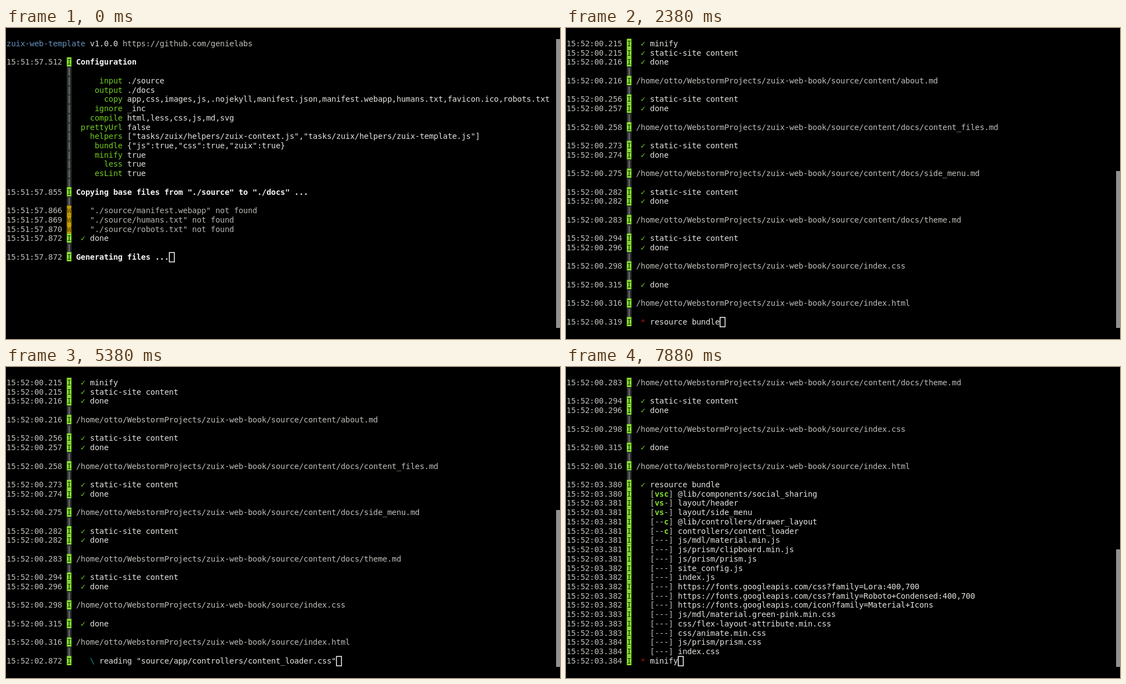
An HTML page with a canvas for the animation above (8000 ms loop, 998 px wide and 561 px high).

```html
<!DOCTYPE html>
<html lang="en">
<head>
<meta charset="utf-8">
<title>Build log</title>
<style>
  html, body { margin: 0; width: 100%; height: 100%; overflow: hidden; background: #000; }
  canvas { display: block; }
</style>
</head>
<body>
<canvas width="998" height="561"></canvas>
<script>
const ctx = document.querySelector('canvas').getContext('2d');
const LOOP = 8000, CELL_W = 8, CELL_H = 16, SCALE = 1.0455;
const FONT = '13.6px "DejaVu Sans Mono", monospace';

// "^x" inside a line switches to style x; capitals are bold
const STYLES = {
  w: '#e2e2de', d: '#bdbfb9', n: '#b4b6b0', b: '#6591bd', g: '#73cb22', c: '#06989a', r: '#b01010',
  k: '#1e4208', y: '#5c4b00', l: '#a09484', B: '#f4f4f2', G: '#80dd2c'
};
const MARKS = { I: ['#8ae234', '^k'], W: ['#c4a000', '^y'], '|': ['#2e3436', '^l'] };

// A row is [time, mark, text]
const bar = (text = '') => ['', '|', text];
const setting = (label, value) => bar('^g' + label.padStart(10) + ' ^w' + value);
const early = (ms, text, mark = 'I') => ['15:51:57.' + ms, mark, text];
const late = (time, text) => ['15:52:0' + time, 'I', text];
const tick = (time, text) => late(time, ' ^g✓ ^w' + text);
const missing = (ms, name) => early(ms, `   ^n"./source/${name}" not found`, 'W');
const page = (time, name) =>
  [late(time, '^d/home/otto/WebstormProjects/zuix-web-book/source/' + name), bar()];
const content = (time, name, built, done) => [
  ...page(time, 'content/' + name),
  tick(built, 'static-site content'), tick(done, 'done'), bar()
];
const item = (ms, flags, name) =>
  late('3.' + ms, `   ^d[${flags.replace(/[a-z]+/, '^G$&^d')}] ^w${name}`);

const intro = [
  ['', '', '^bzuix-web-template ^wv1.0.0 ^dhttps://github.com/genielabs'],
  ['', '', ''],
  early(512, '^BConfiguration'),
  bar(),
  setting('input', './source'),
  setting('output', './docs'),
  setting('copy', 'app,css,images,js,.nojekyll,manifest.json,manifest.webapp,humans.txt,favicon.ico,robots.txt'),
  setting('ignore', '_inc'),
  setting('compile', 'html,less,css,js,md,svg'),
  setting('prettyUrl', 'false'),
  setting('helpers', '["tasks/zuix/helpers/zuix-context.js","tasks/zuix/helpers/zuix-template.js"]'),
  setting('bundle', '{"js":true,"css":true,"zuix":true}'),
  setting('minify', 'true'),
  setting('less', 'true'),
  setting('esLint', 'true'),
  bar(),
  early(855, '^BCopying base files from "./source" to "./docs" ...'),
  bar(),
  missing(866, 'manifest.webapp'),
  missing(869, 'humans.txt'),
  missing(870, 'robots.txt'),
  early(872, ' ^g✓ ^wdone'),
  bar(),
  early(872, '^BGenerating files ...')
];

const log = [
  tick('0.215', 'minify'),
  tick('0.215', 'static-site content'),
  tick('0.216', 'done'),
  bar(),
  ...content('0.216', 'about.md', '0.256', '0.257'),
  ...content('0.258', 'docs/content_files.md', '0.273', '0.274'),
  ...content('0.275', 'docs/side_menu.md', '0.282', '0.282'),
  ...content('0.283', 'docs/theme.md', '0.294', '0.296'),
  ...page('0.298', 'index.css'),
  tick('0.315', 'done'),
  bar(),
  ...page('0.316', 'index.html')
];

const fonts = 'https://fonts.googleapis.com/';
const bundle = [
  tick('3.380', 'resource bundle'),
  item(380, 'vsc', '@lib/components/social_sharing'),
  item(381, 'vs-', 'layout/header'),
  item(381, 'vs-', 'layout/side_menu'),
  item(381, '--c', '@lib/controllers/drawer_layout'),
  item(381, '--c', 'controllers/content_loader'),
  item(381, '---', 'js/mdl/material.min.js'),
  item(381, '---', 'js/prism/clipboard.min.js'),
  item(381, '---', 'js/prism/prism.js'),
  item(382, '---', 'site_config.js'),
  item(382, '---', 'index.js'),
  item(382, '---', fonts + 'css?family=Lora:400,700'),
  item(382, '---', fonts + 'css?family=Roboto+Condensed:400,700'),
  item(382, '---', fonts + 'icon?family=Material+Icons'),
  item(383, '---', 'js/mdl/material.green-pink.min.css'),
  item(383, '---', 'css/flex-layout-attribute.min.css'),
  item(383, '---', 'css/animate.min.css'),
  item(384, '---', 'js/prism/prism.css'),
  item(384, '---', 'index.css'),
  late('3.384', ' ^r* ^wminify')
];

const withStatus = (time, text) => [...log, late(time, text)];

// start time, rows, top of the scrollbar thumb
const screens = [
  [0, intro, 20],
  [2370, withStatus('0.319', ' ^r* ^wresource bundle'), 258],
  [3490, withStatus('1.421', ''), 258],
  [3620, withStatus('1.421', `   ^c\\ ^wdownloading "${fonts}css?family=Roboto+Condensed:400,700"...`), 258],
  [4990, withStatus('2.872', '   ^c\\ ^wreading "source/app/controllers/content_loader.css"'), 258],
  [5490, [...log.slice(19), ...bundle], 329]
];

// Draws styled text on the cell grid and returns the column after it
function print(text, col, row) {
  for (const [i, run] of text.split('^').entries()) {
    if (!i) {
      col += run.length;
      continue;
    }
    const style = run[0];
    ctx.fillStyle = STYLES[style];
    ctx.font = (style < 'a' ? 'bold ' : '') + FONT;
    for (const char of run.slice(1)) {
      if (char !== ' ') ctx.fillText(char, col * CELL_W, row * CELL_H + 13);
      col++;
    }
  }
  return col;
}

function draw(now) {
  const t = now % LOOP;
  const [, rows, thumb] = screens.findLast(([start]) => start <= t);
  ctx.setTransform(1, 0, 0, 1, 0, 0);
  ctx.fillStyle = '#000';
  ctx.fillRect(0, 0, 998, 561);
  ctx.fillStyle = '#919191';
  ctx.fillRect(991, thumb, 7, 541 - thumb);

  ctx.setTransform(SCALE, 0, 0, SCALE, .8, 19.4);
  let end = 0;
  rows.forEach(([time, mark, text], row) => {
    print('^d' + time, 0, row);
    if (mark) {
      const [fill, style] = MARKS[mark];
      ctx.fillStyle = fill;
      ctx.fillRect(13 * CELL_W, row * CELL_H, CELL_W, CELL_H);
      print(style + mark, 13, row);
    }
    end = print(text, mark ? 15 : 0, row);
  });
  ctx.strokeStyle = '#fff';
  ctx.lineWidth = 1.4;
  ctx.strokeRect(end * CELL_W + .7, (rows.length - 1) * CELL_H + .8, 8.6, 16.2);
  requestAnimationFrame(draw);
}
requestAnimationFrame(draw);
</script>
</body>
</html>
```
